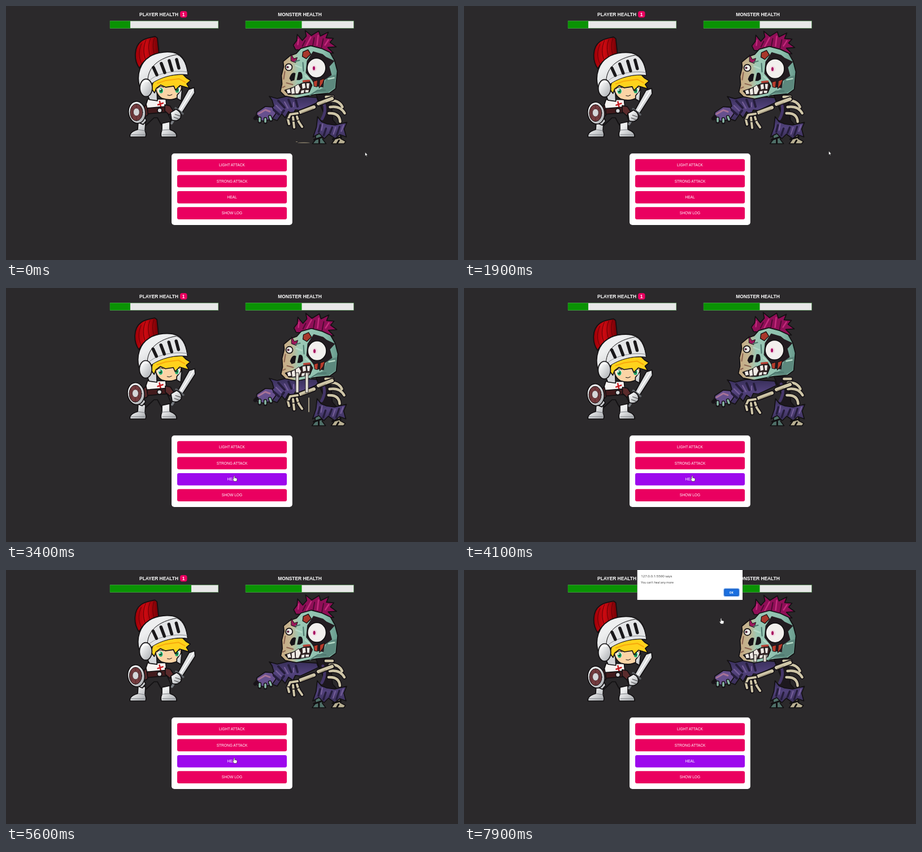
Write an HTML page that moves like this. It is 800 by 450 pixels and loops after 8 s.

```html
<!DOCTYPE html>
<html lang="en">
<head>
<meta charset="utf-8">
<title>Monster fight</title>
<style>
html, body { margin: 0; width: 100%; height: 100%; overflow: hidden; background: #2b292b; }
svg { display: block; width: 800px; height: 450px; }
text { font-family: "Liberation Sans", Arial, sans-serif; fill: #fff; text-anchor: middle; }
.title { font-size: 8.4px; font-weight: bold; }
.label { font-size: 6.6px; }
.dialog text { font-family: "Open Sans", "Noto Sans", sans-serif; text-anchor: start; fill: #333; }
.ink { stroke: #121012; stroke-width: 1.7; stroke-linejoin: round; stroke-linecap: round; }
.bone { fill: none; stroke: #cfc6a8; stroke-width: 4.5; stroke-linecap: round; stroke-linejoin: round; }
.edge { fill: none; stroke: #151115; stroke-width: 7.5; stroke-linecap: round; stroke-linejoin: round; }
</style>
</head>
<body>
<svg viewBox="0 0 800 450">
  <defs>
    <linearGradient id="steel" x1="0" x2="1" y1="0" y2="1">
      <stop offset=".3" stop-color="#eeeff0"/><stop offset="1" stop-color="#a4a7ab"/>
    </linearGradient>
    <linearGradient id="red" x1="0" x2="1"><stop stop-color="#9c0007"/><stop offset=".45" stop-color="#cb0910"/><stop offset="1" stop-color="#700005"/></linearGradient>
    <linearGradient id="skin" x1="0" x2="1"><stop stop-color="#c7a982"/><stop offset=".18" stop-color="#c4b692"/><stop offset=".32" stop-color="#9bc9b5"/><stop offset=".75" stop-color="#8dbfae"/><stop offset="1" stop-color="#679a8c"/></linearGradient>
    <linearGradient id="rag" x1="0" x2="0" y1="0" y2="1"><stop stop-color="#372e58"/><stop offset=".5" stop-color="#52427c"/><stop offset="1" stop-color="#382e56"/></linearGradient>
    <g id="ribs"><path d="M566 161L578 161M573 168Q589 166 595 179M573 179Q591 176 599 190M571 190Q590 189 591 205"/></g>
    <g id="forearm"><path d="M577 164L566 168L553 173M545 179L521 188"/></g>
    <g id="claw"><path d="M516 190L503 192L499 201L501 209M508 197L510 215M515 196L518 205L524 214"/></g>
  </defs>

  <!-- health bars -->
  <text class="title" x="270.5" y="17.5">PLAYER HEALTH</text>
  <rect x="308" y="9" width="12.5" height="11.5" rx="4" fill="#ea0060"/>
  <text class="title" x="314.2" y="17.5">1</text>
  <text class="title" x="520" y="17.5">MONSTER HEALTH</text>
  <g fill="#e8e8e8"><rect x="184" y="26.500" width="192" height="13"/><rect x="424" y="26.500" width="191.500" height="13"/></g>
  <g fill="#0a9304"><rect id="hp" x="184" y="26.500" height="13"/><rect x="424" y="26.500" width="99.500" height="13"/></g>
  <g fill="none" stroke="#3c953c" stroke-width=".5"><rect x="184" y="26.500" width="191.700" height="13"/><rect x="424" y="26.500" width="191.500" height="13"/></g>

  <!-- knight -->
  <g class="ink">
    <path fill="#292729" d="M250 187L285 187L292 203L288 211L275 211L268 198L262 198L247 212L236 206Z"/>
    <path fill="url(#steel)" d="M234 205L247 207L246 221Q249 227 247 232H219.500Q218 223 233 219Z"/>
    <path fill="url(#steel)" d="M276 208L290 205L290 219Q303 223 302 232H275Q273 226 276 220Z"/>
    <path d="M221 228H246M277 228H300M234 219L246 221M276 220L290 219" fill="none" stroke="#7d8085" stroke-width="1"/>
  </g>
  <g id="torso" class="ink">
    <path fill="#5b2b2c" d="M252 170L240 184L241 198L250 194L258 181Z"/>
    <path fill="#f6f3f1" d="M251 165L283 165L285 184L251 187L248 174Z"/>
    <path fill="none" stroke="#c51a20" stroke-width="2.500" d="M272 169L274 178M269 175L278 172"/>
    <path fill="#421b1d" d="M250 181L286 178L288 188L251 191Z"/>
    <circle cx="272" cy="185" r="4" fill="#d7d8da"/>
  </g>
  <g id="sword" class="ink">
    <path fill="url(#steel)" d="M303 184L323 148L333 144.500L334 154L311 190Z"/>
    <path d="M308 185L331 148" stroke="#fff" stroke-width="2"/>
    <path d="M293 208L301 195" stroke="#777b80" stroke-width="4"/>
    <path d="M300 181L313 191" stroke="#5c5f64" stroke-width="3.500"/>
    <path fill="#5b2b2c" d="M281 175L290 177L296 186L289 193L281 186Z"/>
    <path fill="url(#steel)" d="M291 189L301 183Q312 188 309 198Q303 206 293 202Z"/>
    <path d="M299 192L308 195M297 197L305 200" stroke-width=".8" fill="none"/>
  </g>
  <g id="shield" class="ink">
    <path fill="url(#steel)" d="M235 198L245 196L249 203L243 210L236 207Z"/>
    <ellipse cx="232" cy="188.500" rx="15" ry="19.500" fill="url(#steel)" transform="rotate(-8 232 188)"/>
    <ellipse cx="231" cy="188.500" rx="11" ry="15" fill="#743b3e" stroke-width="1"/>
    <path d="M224 181V197M237 180V197M231 175V202" stroke="#562a2d" stroke-width="1"/>
    <ellipse cx="231" cy="188" rx="5.500" ry="7" fill="#d5d6d9" stroke="#56383b" stroke-width="1"/>
  </g>
  <g id="helm" class="ink">
    <path fill="url(#red)" d="M236 110C226 96 226 72 240 62C248 56 257 56 264 54L268 57L271 85C255 87 243 97 236 110Z"/>
    <path d="M248 97C242 83 243 72 248 60M256 91C251 77 252 66 256 58M263 87C259 74 260 64 263 56M240 102C234 90 235 78 240 67" stroke="#5e0006" fill="none" stroke-width="1"/>
    <path fill="#d4d6d9" d="M240 130L254 166L268 168L267 148L260 126Z"/>
    <path fill="#fbd4a5" d="M264 139L310 133Q313 152 306 161Q294 169 277 164Q265 158 264 139Z"/>
    <path fill="url(#steel)" d="M303 158L312 146L310 168L303 164Z"/>
    <g stroke="none">
      <ellipse cx="274" cy="149.500" rx="5" ry="5.500" fill="#fff"/><ellipse cx="304" cy="148.500" rx="4.500" ry="5.500" fill="#fff"/>
      <ellipse cx="274.500" cy="150" rx="3.700" ry="4.700" fill="#27a866"/><ellipse cx="303" cy="149" rx="3.300" ry="4.700" fill="#27a866"/>
      <circle cx="274.500" cy="150" r="1.700" fill="#123c26"/><circle cx="303" cy="149" r="1.600" fill="#123c26"/>
      <circle cx="273" cy="148" r="1.300" fill="#fff"/><circle cx="301.500" cy="147" r="1.200" fill="#fff"/>
    </g>
    <path d="M268 146Q273 141 279 144M299 143Q304 140 308 144M286 158Q290 160 294 157" fill="none" stroke-width="1"/>
    <path fill="#ffd21c" d="M257 146L262 130L308 116L319 127L327 132L320 138L325 146L308 141L300 149L297 142L283 144L274 140L266 146L263 154Z"/>
    <path d="M268 137L283 132L306 129L317 135" stroke="#f7a90d" fill="none" stroke-width="2"/>
    <path fill="url(#steel)" d="M236 141C231 121 238 100 254 90C267 81 291 79 304 85C317 91 320 107 322 122C302 119 275 124 257 137L241 148Z"/>
    <path fill="#e4e5e7" d="M251 131C252 108 270 92 303 86C316 92 320 107 322 122C302 119 275 125 257 138Z" stroke-width="1"/>
    <path fill="none" stroke="#85898e" stroke-width="1" d="M253 133C266 119 300 113 321 117"/>
    <path stroke="#19171a" stroke-width="5.500" d="M261 109L267 122M275 102L281 118M289 97L294 114M302 95L306 110"/>
    <ellipse cx="248" cy="145" rx="11" ry="15.500" fill="url(#steel)"/>
    <path d="M241 139Q245 131 251 134" stroke="#fff" fill="none" stroke-width="2"/>
  </g>

  <!-- monster -->
  <g id="puddle" fill="#8a806c"><ellipse cx="527" cy="242.300" rx="11" ry=".8"/><rect x="513" y="240" width="3" height="1"/></g>
  <g id="body" class="ink">
    <path fill="#1d181e" d="M548 156L574 158L578 202L590 216L551 216L562 190Z"/>
    <path fill="#4f6f68" d="M547 226H561L560 236L566 244H542L548 236Z"/>
    <path fill="#b8af92" d="M579 226H591L592 235L601 240L598 244H576L581 237Z"/>
    <path d="M545 237L563 231M554 236V243M578 236L593 232M589 238L586 243" stroke-width="3"/>
    <path fill="url(#rag)" d="M551 196L558 205L568 209L582 211L603 206L598 218L602 232L591 228L582 235L571 227L563 235L554 226L543 232L549 215Z"/>
    <path fill="none" stroke="#251d3b" stroke-width="3.500" d="M556 211L553 223M566 217L562 229M577 215L573 225M590 214L585 229"/>
    <path fill="none" stroke="#77609a" stroke-width="2" d="M560 209L558 220M583 215L579 227M597 211L593 222"/>
    <path fill="none" stroke="#443568" stroke-width="5" d="M561 170Q568 184 559 200"/>
    <use href="#ribs" class="edge"/><use href="#ribs" class="bone"/>
  </g>
  <g id="reach" class="ink">
    <path fill="url(#rag)" d="M466 160L480 164L500 159L550 162L553 170L534 179L521 185L512 184L508 193L500 187L494 198L488 191L480 203L472 200L460 202L453 194L464 185L474 177L471 167Z"/>
    <path fill="#67508e" d="M444 188L459 178L471 179L478 190L471 200L456 204L442 200Z"/>
    <path d="M449 199V205M459 200V206M467 196L469 202M444 196L441 199" stroke="#171318" stroke-width="6.500" fill="none"/>
    <path d="M449 199V204M459 200V205M467 196L469 201" stroke="#88b9a6" stroke-width="3.500" fill="none"/>
    <path d="M447 191L459 184L467 187" stroke="#a77397" stroke-width="3" fill="none"/>
    <path d="M482 168L493 180M500 166L505 178M474 184L483 192M513 167L516 178M492 185L489 189" stroke="#251d3b" stroke-width="4" fill="none"/>
    <path d="M478 176L487 185M493 170L499 181M509 171L509 178" stroke="#77609a" stroke-width="2" fill="none"/>
  </g>
  <g id="arm">
    <use href="#forearm" class="edge" style="stroke-width:9.5px"/><use href="#forearm" class="bone" style="stroke-width:6px"/>
    <use href="#claw" class="edge"/><use href="#claw" class="bone" style="stroke-width:4px"/>
    <path d="M554 175L566 170M523 189.500L544 181.500" stroke="#9c9277" stroke-width="1.500"/>
    <path d="M498 200H502M507 204H512M515 203L520 201" stroke="#151115" stroke-width="1.300"/>
  </g>
  <g id="head" class="ink">
    <path fill="#8f0f57" d="M513 78L509 70L515 62L516 51L525 62L532 54L530 44L541 53L554 45L557 54L571 47L567 57L580 58L574 65L585 73L570 74L580 84L553 84L530 79Z"/>
    <path d="M517 69L518 60M532 71L540 56M551 70L553 53M565 70L571 61" stroke="#c42a7c" stroke-width="2.500" fill="none"/>
    <path d="M525 72L530 62M543 73L546 57M559 74L562 59" stroke="#4c0a31" stroke-width="2" fill="none"/>
    <path fill="url(#skin)" d="M486 152L489 139L488 124L492 108L491 99L503 89L514 85L522 76L540 71L559 76L574 83L582 97L587 116L584 147L573 155L550 157L533 160L514 164L494 160Z"/>
    <path fill="#5c887d" stroke="none" d="M568 126L585 122L582 146L570 154L545 155L561 146Z"/>
    <path fill="#231c21" stroke="none" d="M544 81L561 86L567 91L582 98L573 108L577 123L564 132L562 145L549 143L541 131L531 119L533 98Z"/>
    <path fill="#a8372b" stroke-width="1.300" d="M526 82L535 78L540 86L532 94L525 90Z"/>
    <path fill="#b83b2b" stroke-width="1" d="M545 134L552 132L551 144L546 143ZM556 132L564 129L561 138L555 146Z"/>
    <path fill="#9c175a" stroke-width="1" d="M505 86L510 94L516 92L513 101L505 98Z"/>
    <ellipse cx="501" cy="109" rx="6" ry="6" fill="#ece9e5"/><circle cx="499" cy="109" r="1.500" fill="#a7145d" stroke-width="1"/>
    <ellipse cx="550" cy="110.500" rx="16.500" ry="17.500" fill="#f2efed"/>
    <ellipse cx="546" cy="111" rx="4.500" ry="5.500" fill="#f2d9e2" stroke="none"/><ellipse cx="545.500" cy="111" rx="2" ry="3.500" fill="#a60d60" stroke="none"/>
    <path fill="#171318" stroke="none" d="M502 129Q506 116 513 120L511 132L505 134ZM515 132L518 118Q526 115 525 129L520 132Z"/>
    <path fill="#33201f" d="M494 150L509 145L526 137L538 134L542 141L537 153L518 157L500 157Z"/>
    <g fill="#efeae4" stroke="#2a2225" stroke-width="1">
      <path d="M497 149L503 147L505 155L499 156ZM505 147L511 144L512 156L506 157ZM512 143L518 139L522 147L518 156L513 156ZM524 138L530 137L531 146L525 148ZM532 137L538 137L537 147L533 147Z"/>
      <path d="M523 150L529 149L528 155L522 156ZM530 149L537 149L536 154L530 154Z"/>
    </g>
    <path d="M527 134L537 133" stroke="#b64134" stroke-width="3.500"/>
    <path d="M494 117L492 130M497 137L508 140M490 145L494 143" stroke="#8b6350" stroke-width="2" fill="none"/>
    <path d="M513 106L523 110M571 130L581 128M530 124L537 130" stroke="#b5dac7" stroke-width="2.500" fill="none"/>
    <path d="M512 99L520 97M526 101L527 116M538 159L552 150L566 150" stroke="#4c756c" stroke-width="2" fill="none"/>
  </g>
  <g id="drool" fill="#e4e1d6" stroke="#302b2c">
    <rect x="513" y="150" width="5"/><rect x="530" y="150" width="5"/>
  </g>
  <rect id="drop" x="535" width="2" height="26" rx="1" fill="#a89f87"/>

  <!-- commands -->
  <rect x="293" y="261.300" width="213.800" height="126.700" rx="5" fill="#fff"/>
  <g id="buttons"></g>

  <g id="dialog" class="dialog">
    <rect x="306" y="0" width="187.500" height="53.500" fill="#181718" opacity=".4"/>
    <rect x="306.700" y="0" width="186.300" height="53" fill="#fff"/>
    <text x="313.300" y="12.600" font-size="6.100">127.0.0.1:5500 says</text>
    <text x="313.300" y="24" font-size="5.200">You can't heal any more</text>
    <rect x="459.500" y="32.500" width="28" height="14.500" rx="2.500" fill="#5b9bf0"/>
    <rect x="461" y="34" width="25" height="11.500" rx="1.800" fill="#1a6fe0" stroke="#174ea6" stroke-width=".8"/>
    <text x="469.600" y="41.600" font-size="5" font-weight="bold" style="fill:#fff">OK</text>
  </g>
  <path id="arrow" fill="#fff" stroke="#111" stroke-width=".5" d="M0 0V6.800L1.600 5.400L2.700 7.800L3.700 7.300L2.600 5H4.700Z"/>
  <path id="hand" fill="#fff" stroke="#222" stroke-width=".6" d="M-.9 .5Q0-.6 .9 .5V3.800L4.600 4.700Q5.400 5 5 6.800L4.200 10H-.3L-3 6.300Q-3 5 -.9 6.200Z"/>
</svg>
<script>
const LOOP = 8000, STEP = 100, FREEZE = 7100;
const $ = id => document.getElementById(id);
const set = (el, attrs) => { for (const k in attrs) el.setAttribute(k, attrs[k]); };
const move = (id, x, y) => set($(id), { transform: `translate(${x} ${y})` });
const show = (id, on) => set($(id), { visibility: on ? "visible" : "hidden" });

const labels = ["LIGHT ATTACK", "STRONG ATTACK", "HEAL", "SHOW LOG"];
const buttonTop = i => 271.2 + i * 28.35;
$("buttons").innerHTML = labels.map((label, i) =>
  `<rect x="303" y="${buttonTop(i)}" width="194" height="21.8" rx="3"/>
   <text class="label" x="400" y="${buttonTop(i) + 13}">${label}</text>`).join("");
const buttons = [...$("buttons").querySelectorAll("rect")];

// time, x, y
const path = [[0, 635.5, 259], [500, 645.5, 257], [1900, 645.5, 257], [2600, 532.5, 311],
  [2800, 445, 364], [3100, 404, 332.5], [7300, 404, 332.5], [7700, 455, 85.5], [8000, 455, 85.5]];
// time, arm drop
const armDrop = [[0, 0], [40, 0], [100, 7], [480, 7], [640, 0], [1280, 0]];

function sample(keys, t) {
  const i = Math.max(1, keys.findIndex(k => k[0] >= t));
  const a = keys[i - 1], b = keys[i], u = (t - a[0]) / (b[0] - a[0]);
  return a.slice(1).map((v, j) => v + (b[j + 1] - v) * u);
}

function drawKnight(t) {
  const s = Math.cos((t - 1300) / 1050 * 2 * Math.PI);
  move("helm", -.8 * s, -s);
  move("torso", -.4 * s, -.7 * s);
  move("shield", -2 * s, -1.3 * s);
  move("sword", s, -1.5 * s);
}

function drawMonster(t) {
  const p = t % 1280, s = Math.cos((p - 110) / 1280 * 2 * Math.PI);
  const [drop] = sample(armDrop, p);
  move("head", -.6 * s, -.8 * s);
  move("body", .5 * s, 0);
  move("arm", 0, drop);
  move("reach", 0, drop * .4);
  show("puddle", p > 930 || p < 70);
  show("drool", p > 620 && p < 1050);
  const height = p < 900 ? Math.max(0, p - 620) * .16 : 8;
  for (const strand of $("drool").children) set(strand, { height });
  show("drop", p > 780 && p < 1040);
  move("drop", 0, 192 + Math.max(0, p - 820) * .1);
}

function draw(t) {
  const page = Math.min(t, FREEZE);
  drawKnight(page);
  drawMonster(page);

  const heals = [4200, 5600, 6700].filter(h => t >= h).length;
  set($("hp"), { width: [36, 89.6, 144, 191.7][heals] });

  const [x, y] = sample(path, t);
  const [hx, hy] = sample(path, page);
  let over = false;
  buttons.forEach((b, i) => {
    const hit = hx > 303 && hx < 497 && hy > buttonTop(i) && hy < buttonTop(i) + 22;
    over = over || hit;
    set(b, { fill: hit ? "#9d08ed" : "#ea0060" });
  });
  show("arrow", !over);
  show("hand", over);
  move(over ? "hand" : "arrow", x, y);
  show("dialog", t >= 7200);
}

function frame(now) {
  draw(Math.floor(now % LOOP / STEP) * STEP);
  requestAnimationFrame(frame);
}
draw(0);
requestAnimationFrame(frame);
</script>
</body>
</html>
```
